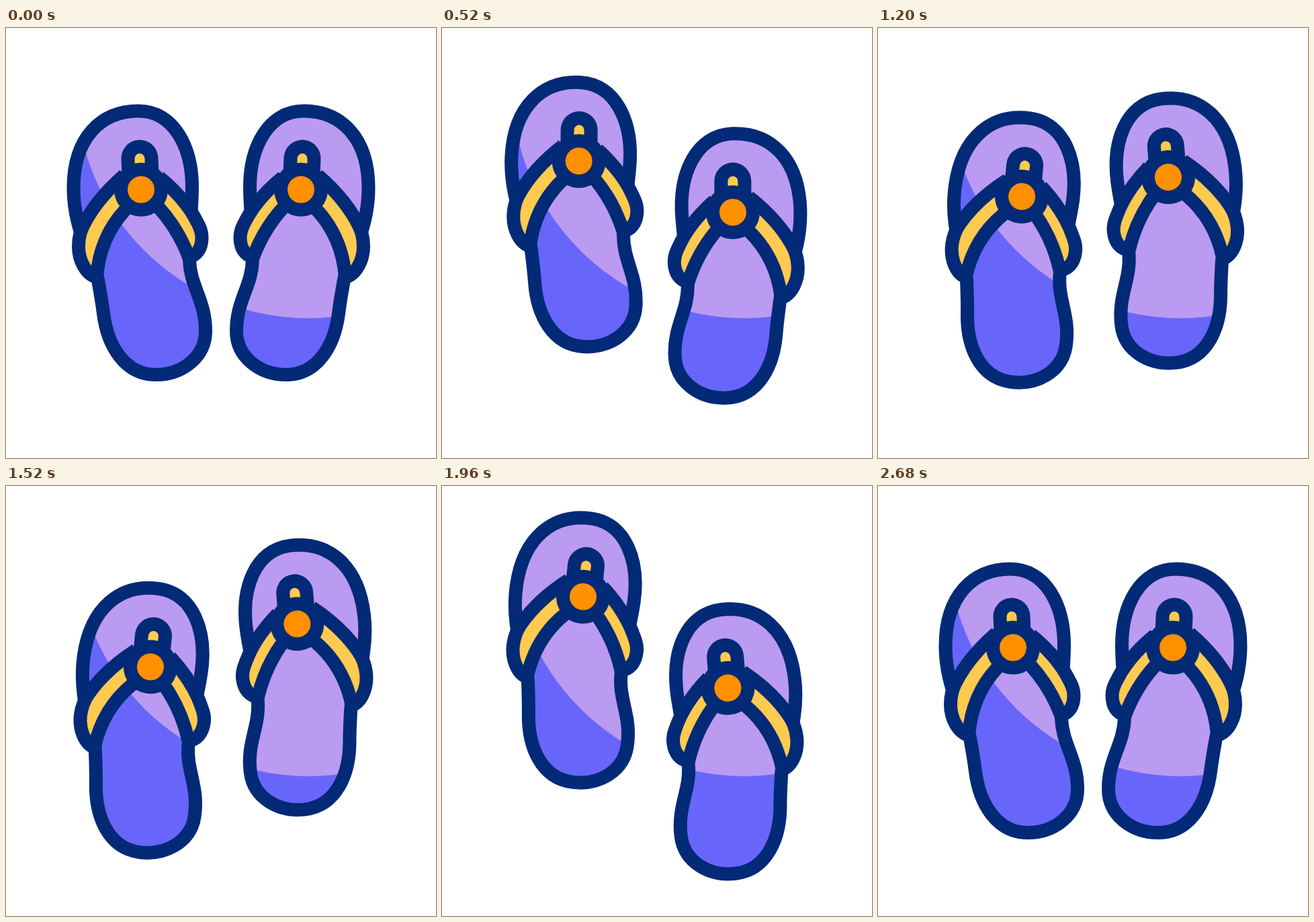
Write an HTML page that moves like this. It is 640 px wide and 640 px high and loops after 2.8 s.

```html
<!DOCTYPE html>
<html lang="en">
<head>
<meta charset="utf-8">
<title>Walking flip-flops</title>
<style>
  html, body { margin: 0; width: 100%; height: 100%; overflow: hidden; background: #fff; }
  svg { display: block; width: 100vw; height: 100vh; }
  .line { fill: none; stroke: #032a76; stroke-width: 20; stroke-linejoin: round; }
  .strap { fill: #ffca50; }
</style>
</head>
<body>
<svg viewBox="0 0 640 640">
  <defs>
    <path id="sole" d="M197 123.5C250 123.5 277 178 277 237C277 275 271 305 273 345
      C274 385 297 405 297 451C297 490 262 516 223 516C176 516 151 472 145 425
      C143 408 140 392 137 375C128 340 100.5 300 100.5 238C100.5 165 140 123.5 197 123.5Z"/>
    <g id="top">
      <use href="#sole" class="line"/>
      <path d="M199 194L200 218" stroke="#032a76" stroke-width="55" stroke-linecap="round"/>
      <path d="M199 194.3L199.3 218" stroke="#ffca50" stroke-width="15" stroke-linecap="round"/>
      <path class="line strap" d="M176 219C155 237 130 264 115 294C112 300 108 312 108 325
        C108 346 119 367 135 371C138 330 152 298 178 270"/>
      <path class="line strap" d="M228 222C250 240 272 264 284 288C289 297 291.5 303 291.5 312
        C291.5 328 284 339 272 341C262 314 246 288 228 268"/>
      <circle cx="201" cy="240.5" r="30" class="line" style="fill:#ff9100"/>
    </g>
    <clipPath id="clipL"><use href="#sole" class="left"/></clipPath>
    <clipPath id="clipR"><use href="#sole" class="right"/></clipPath>
  </defs>
  <use href="#sole" class="left" fill="#6866fa"/>
  <use href="#sole" class="right" fill="#6866fa"/>
  <g fill="#bb9af2">
    <circle cx="450" cy="86" r="346" clip-path="url(#clipL)"/>
    <circle cx="450" cy="86" r="346" clip-path="url(#clipR)"/>
  </g>
  <use href="#top" class="left"/>
  <use href="#top" class="right"/>
</svg>
<script>
const LOOP = 2800, STEP = 40, BEAT = 600, START = 200, LAG = 70;
const lefts = document.querySelectorAll(".left");
const rights = document.querySelectorAll(".right");

function ease(u) {
  u = Math.min(1, Math.max(0, u));
  return u * u * (3 - 2 * u);
}

// Eased walk through equally spaced stops
function along(stops, t) {
  const beat = (t - START) / BEAT;
  let v = stops[0];
  for (let i = 1; i < stops.length; i++) {
    v += (stops[i] - stops[i - 1]) * ease(beat - i + 1);
  }
  return v;
}

function place(nodes, x, y, angle, flip) {
  const m = `translate(${x} ${y}) rotate(${angle}) scale(${flip} 1) translate(-201 -240.5)`;
  nodes.forEach(n => n.setAttribute("transform", m));
}

function draw(t) {
  const turn = along([0, 1, 1, 1, 0], t - LAG);
  const dl = along([0, -77.2, 41, -77.2, 0], t);
  const dr = along([0, 61.5, -46.5, 61.5, 0], t);
  place(lefts, 201 + 12.6 * turn + 0.048 * dl, 240.5 + dl, 8 * turn, 1);
  place(rights, 439 - 8.6 * turn - 0.084 * dr, 240.5 + dr, -7 * turn, -1);
}

const t0 = performance.now();
function tick() {
  const t = (performance.now() - t0) % LOOP;
  draw(Math.floor(t / STEP) * STEP);
  requestAnimationFrame(tick);
}
tick();
</script>
</body>
</html>
```
